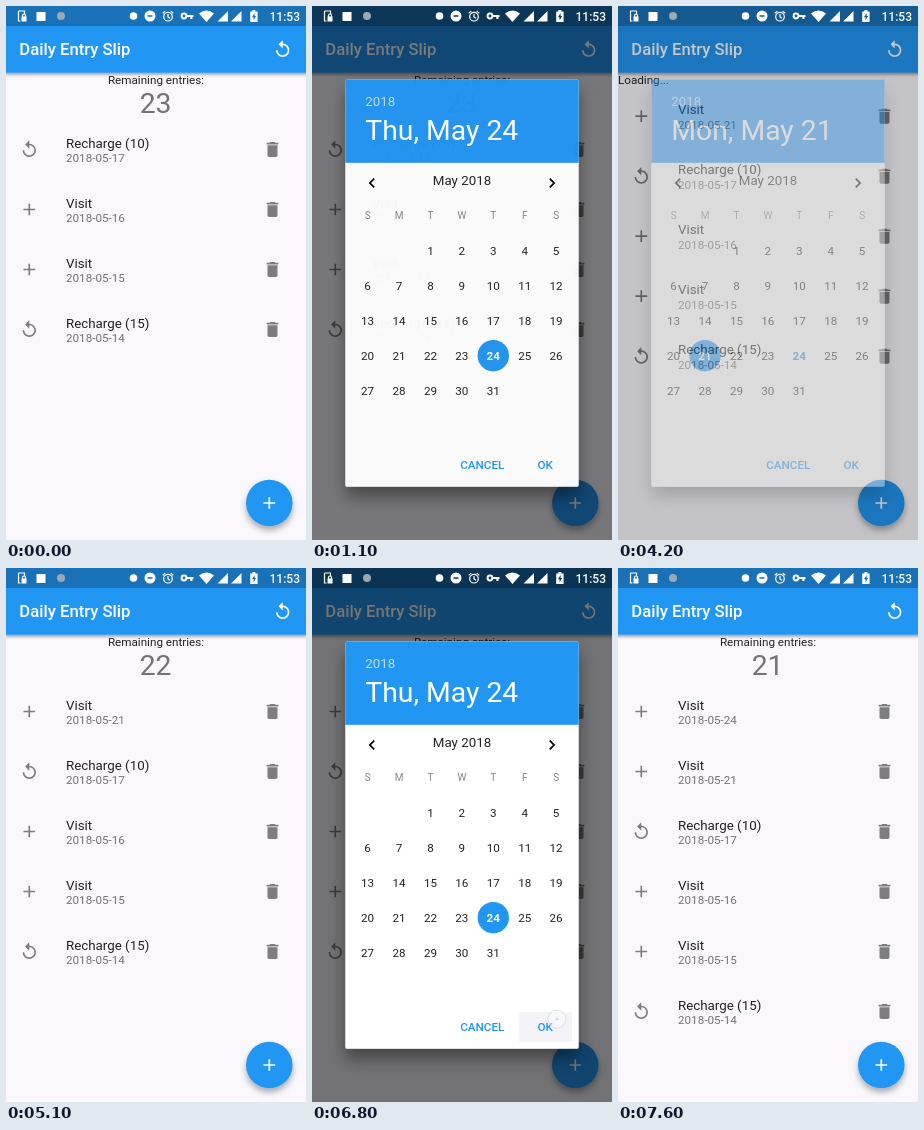
An HTML page for the animation above (8 s loop, 300 px wide and 534 px high).

```html
<!DOCTYPE html>
<html lang="en">
<head>
<meta charset="utf-8">
<title>Daily Entry Slip</title>
<style>
html, body { margin: 0; width: 100%; height: 100%; overflow: hidden; background: #faf8fc; }
svg { display: block; width: 100vw; height: 100vh; font-family: Roboto, sans-serif; }
</style>
</head>
<body>
<svg id="stage" viewBox="0 0 300 534"></svg>
<script>
const LOOP = 8000, TICK = 100;
const DP = 300 / 360;              // stage pixels per layout unit
const BLUE = '#2196f3', INK = 'rgba(0,0,0,.87)', SOFT = 'rgba(0,0,0,.54)';

const ICONS = {
  replay: 'M12 5V1L7 6l5 5V7c3.31 0 6 2.69 6 6s-2.69 6-6 6-6-2.69-6-6H4c0 4.42 3.58 8 8 8s8-3.58 8-8-3.58-8-8-8z',
  plus: 'M19 13h-6v6h-2v-6H5v-2h6V5h2v6h6v2z',
  trash: 'M6 19c0 1.1.9 2 2 2h8c1.1 0 2-.9 2-2V7H6v12zM19 4h-3.5l-1-1h-5l-1 1H5v2h14V4z',
  left: 'M15.41 7.41L14 6l-6 6 6 6 1.41-1.41L10.83 12z',
  right: 'M10 6L8.59 7.41 13.17 12l-4.58 4.59L10 18l6-6z'
};
const HISTORY = [['Recharge (10)', 17], ['Visit', 16], ['Visit', 15], ['Recharge (15)', 14]];

// Each visit: tap the button, pick a day, confirm.
const VISITS = [
  { day: 21, tap: 800, open: 970, press: 3900, close: 4080, saved: 4200, done: 4300 },
  { day: 24, tap: 6000, open: 6170, press: 6600, close: 6880, saved: 7000, done: 7100 }
];
const PICK = { tap: 3400, change: 3500, end: 3600 };

const text = (s, x, y, sp, fill = INK, extra = '') =>
  `<text x="${x}" y="${y}" font-size="${sp * DP}" fill="${fill}" ${extra}>${s}</text>`;
const centered = (s, x, y, sp, fill, extra = '') =>
  text(s, x, y, sp, fill, `text-anchor="middle" ${extra}`);
const rect = (x, y, w, h, fill, extra = '') =>
  `<rect x="${x}" y="${y}" width="${w}" height="${h}" fill="${fill}" ${extra}/>`;
const circle = (x, y, r, fill, extra = '') =>
  `<circle cx="${x}" cy="${y}" r="${r}" fill="${fill}" ${extra}/>`;
const path = (d, fill = '#fff', extra = '') => `<path d="${d}" fill="${fill}" ${extra}/>`;
const icon = (name, x, y, fill) =>
  path(ICONS[name], fill, `transform="translate(${x} ${y}) scale(${DP}) translate(-12 -12)"`);
const within = (t, from, to) => t >= from && t < to;
const clamp = v => Math.max(0, Math.min(1, v));
const easeOut = p => 1 - (1 - p) ** 2;
const MEDIUM = 'font-weight="500"';

const DEFS = `<defs>
  <filter id="barShadow" x="-10%" y="-30%" width="120%" height="200%">
    <feDropShadow dx="0" dy="2" stdDeviation="1.8" flood-opacity=".35"/></filter>
  <filter id="fabShadow" x="-40%" y="-40%" width="180%" height="200%">
    <feDropShadow dx="0" dy="4" stdDeviation="3.2" flood-opacity=".32"/></filter>
  <filter id="dialogShadow" x="-20%" y="-20%" width="140%" height="140%">
    <feDropShadow dx="0" dy="10" stdDeviation="8" flood-opacity=".4"/></filter>
</defs>`;

function statusIcons() {
  const line = 'stroke="#fff" stroke-width="1.2"';
  return path('M12.5 5h6v3M12.5 5v10h2', 'none', line)
    + rect(15.5, 10.5, 5, 5, '#fff') + path('M16.5 11V9.5a1.5 1.5 0 0 1 3 0V11', 'none', line)
    + rect(30.5, 6, 9, 9, '#fff')
    + circle(55, 10, 4, '#9aa9b5')
    + circle(127.5, 10, 3.8, '#fff')
    + path('M138.5 10a5.5 5.5 0 1 0 11 0a5.5 5.5 0 1 0-11 0M141.5 9.3h5v1.5h-5z', '#fff', 'fill-rule="evenodd"')
    + circle(162, 10.7, 4.3, 'none', line)
    + path('M162 8v3l2 1.2M156.7 7.3l2.6-2.2M167.3 7.3l-2.6-2.2', 'none', line)
    + circle(178, 10, 2.4, 'none', 'stroke="#fff" stroke-width="2"')
    + path('M180.5 9h7v2h-1v2h-2.2v-2h-3.8z')
    + path('M193 7.5Q200.5 1.5 208 7.5L200.5 16z')
    + path('M211.5 15.5h10.5v-10.5zM225 15.5h10.5v-10.5z')
    + path('M244.2 5.5h2.2V4h3v1.5h2.2V16h-7.4zM248.6 7l-2.6 4.2h1.6v3l2.5-4.2h-1.5z', '#fff', 'fill-rule="evenodd"')
    + text('11:53', 263.5, 14.6, 14.4, '#fff', MEDIUM);
}

function page(entries, remaining, loading) {
  let out = rect(0, 0, 300, 534, '#faf8fc')
    + rect(-10, 0, 320, 66.7, BLUE, 'filter="url(#barShadow)"')
    + rect(0, 0, 300, 20, '#1971b7')
    + text('Daily Entry Slip', 13.3, 49.4, 20, '#fff', MEDIUM)
    + icon('replay', 276.7, 43.3, '#fff');
  out += loading
    ? text('Loading...', 0, 77.6, 14)
    : centered('Remaining entries:', 150, 77.6, 14) + centered(remaining, 149.6, 107, 34, SOFT);
  const top = loading ? 110.2 : 143.5;
  entries.forEach(([label, day], i) => {
    const y = top + 60 * i;
    out += icon(label === 'Visit' ? 'plus' : 'replay', 23.3, y, 'rgba(0,0,0,.5)')
      + text(label, 60, y - 2, 16) + text('2018-05-' + day, 60, y + 12.4, 14, SOFT)
      + icon('trash', 266.5, y, 'rgba(0,0,0,.5)');
  });
  return out + circle(263.3, 497, 23.3, BLUE, 'filter="url(#fabShadow)"')
    + icon('plus', 263.3, 497, '#fff');
}

function dialog(selected, pressed) {
  const column = i => 55.6 + 31.42 * i;
  let out = rect(33.3, 73.5, 233.4, 407.2, '#fff', 'rx="1.6" filter="url(#dialogShadow)"')
    + rect(33.3, 73.5, 233.4, 83.3, BLUE)
    + text(2018, 53.3, 100, 16, 'rgba(255,255,255,.7)')
    + text(`${selected === 24 ? 'Thu' : 'Mon'}, May ${selected}`, 53.3, 134.2, 34, '#fff')
    + icon('left', 60, 177, '#000') + icon('right', 240, 177, '#000')
    + centered('May 2018', 150, 179.2, 16);
  [...'SMTWTFS'].forEach((d, i) => out += centered(d, column(i), 212.8, 12, 'rgba(0,0,0,.48)'));
  for (let day = 1; day <= 31; day++) {
    const cell = day + 1, x = column(cell % 7), y = 244.6 + 35 * Math.floor(cell / 7);
    const chosen = day === selected, strong = chosen || day === 24;
    if (chosen) out += circle(x, y + .1, 15.7, BLUE);
    out += centered(day, x, y + 4.1, 14, chosen ? '#fff' : strong ? BLUE : INK, strong ? 'font-weight="700"' : '');
  }
  if (pressed) out += rect(206.7, 444, 53.3, 30, '#f4f3f7', 'rx="1.6"');
  return out + centered('CANCEL', 170.3, 463.2, 14, BLUE, MEDIUM)
    + centered('OK', 233.2, 463.2, 14, BLUE, MEDIUM);
}

const pointer = (x, y) =>
  circle(x, y, 9, 'rgba(255,255,255,.35)', 'stroke="#d3d8e2" stroke-width=".8"')
  + circle(x, y, 1.5, '#c3dcf3');

function render(t) {
  const saved = VISITS.filter(v => t >= v.saved);
  const entries = [...saved.map(v => ['Visit', v.day]).reverse(), ...HISTORY];
  const loading = VISITS.some(v => within(t, v.saved, v.done));
  const pressed = VISITS.some(v => within(t, v.press, v.close));
  const shown = Math.max(...VISITS.map(v =>
    easeOut(clamp(Math.min((t - v.open) / 160, 1 - (t - v.close) / 155)))));
  const selected = within(t, PICK.change, VISITS[0].done) ? 21 : 24;

  let out = DEFS + page(entries, 23 - saved.length, loading);
  for (const v of VISITS) if (within(t, v.tap, v.open)) {
    out += circle(263.3, 497, 12 + (t - v.tap) * .1, 'rgba(255,255,255,.2)') + pointer(263, 497);
  }
  if (shown > 0) {
    out += rect(0, 0, 300, 534, '#000', `opacity="${.54 * shown}"`)
      + `<g opacity="${shown}">${dialog(selected, pressed)}</g>`;
  }
  if (pressed) out += pointer(245, 451);
  if (within(t, PICK.tap, PICK.end)) out += pointer(87, 350);
  stage.innerHTML = out + statusIcons();
}

const stage = document.getElementById('stage');
const start = performance.now();
let last = -1;
function frame() {
  const t = Math.floor((performance.now() - start) % LOOP / TICK) * TICK;
  if (t !== last) render(last = t);
  requestAnimationFrame(frame);
}
frame();
</script>
</body>
</html>
```
